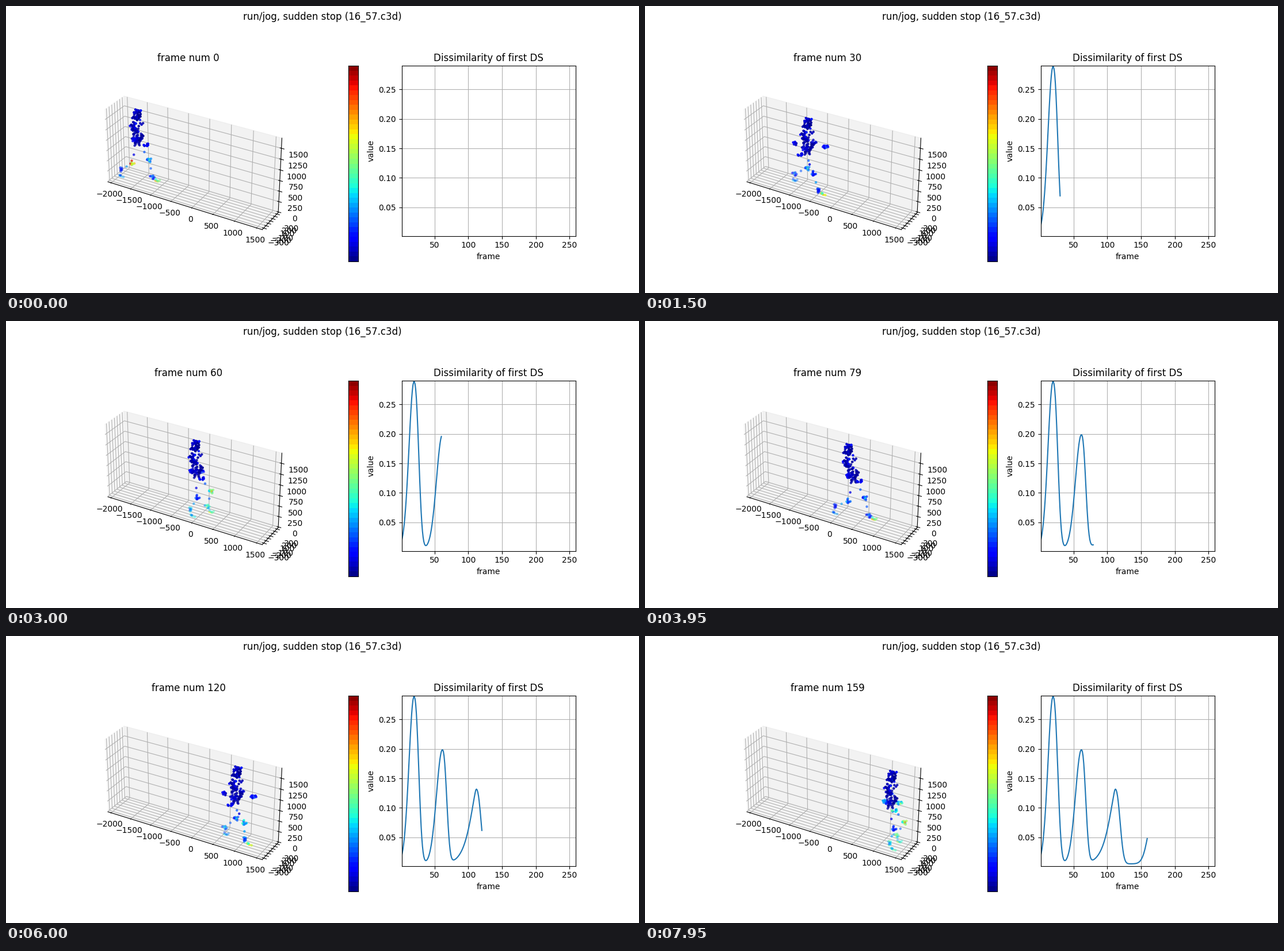
Write a matplotlib script that moves like this. It is 1100 px wide and 500 px high and loops after 8 s.

```python
import matplotlib.pyplot as plt
import numpy as np
from matplotlib.animation import FuncAnimation

FRAMES, INTERVAL = 160, 50
LEVELS = 40
W, H = 1100, 500
HIP_Z, HEAD_Z = 870, 1580

jet = plt.get_cmap("jet")
rng = np.random.default_rng(16)


def bump(x, centre, width, power=2):
    return np.exp(-np.abs((x - centre) / width) ** power)


def cloud(count, *radii):
    """Marker offsets inside an ellipsoid, each with its heat factor and floor."""
    v = rng.normal(size=(count, 3))
    v /= np.linalg.norm(v, axis=1, keepdims=True)
    v *= rng.uniform(0.25, 1, (count, 1)) ** 0.5
    return v * radii, rng.uniform(0.55, 1.35, count), rng.exponential(0.03, count)


PARTS = {
    "head": cloud(46, 100, 100, 145),
    "crown": cloud(1, 5, 5, 5),
    "chest": cloud(34, 125, 185, 130),
    "waist": cloud(42, 135, 150, 105),
    "hips": cloud(12, 75, 95, 80),
}
for side in "AB":
    PARTS.update({
        "elbow" + side: cloud(7, 55, 45, 45),
        "hand" + side: cloud(9, 75, 50, 50),
        "thigh" + side: cloud(1, 10, 10, 10),
        "knee" + side: cloud(10, 55, 50, 60),
        "shin" + side: cloud(1, 10, 10, 10),
        "ankle" + side: cloud(9, 65, 45, 60),
        "toe" + side: cloud(6, 70, 50, 30),
    })


def limb(length, degrees):
    """Vector hanging down, turned forward by an angle."""
    a = np.radians(degrees)
    return np.array([length * np.sin(a), 0, -length * np.cos(a)])


def leg(hip, cycle):
    """Joints of one leg; the foot touches down in front at cycle 0."""
    c, s = np.cos(cycle), np.sin(cycle)
    bend = -21 + 33 * c + 11 * s
    knee = hip + limb(420, 21.5 + 20.5 * c - 7.5 * s - 11 * np.cos(2 * cycle))
    ankle = knee + limb(405, bend)
    toe = ankle + limb(150, bend + 65)
    lift_off = bump(cycle / np.pi % 2, 0.93, 0.06)
    return {
        "thigh": ((hip + knee) / 2, 0.15),
        "knee": (knee, 0.14 + 0.3 * max(0, -s) + 0.6 * lift_off),
        "shin": ((knee + ankle) / 2, 0.2),
        "ankle": (ankle, 0.13 + 0.25 * s * s),
        "toe": (toe, 0.43 + 0.17 * c),
    }


def arm(shoulder, cycle, heat):
    upper = -12 + 27 * np.cos(cycle)
    elbow = shoulder + limb(300, upper)
    return {
        "elbow": (elbow, 0.6 * heat),
        "hand": (elbow + limb(260, upper + 65), heat),
    }


def pose(t):
    """Centre and heat of every body part."""
    # The runner slows down; while braking the pelvis leads and the head lags.
    brake = bump(t, 79, 18)
    x = -1542 + 27.5 * t - 0.066 * t * t + 110 * brake
    steps = 0.93 + 0.019 * t + 0.6 * (1 - np.exp(-t / 12))
    hand_heat = 0.1 + 0.3 * bump(t, 165, 15)

    def spine(z, dx=0, y=0):
        lag = 150 * brake * (z - HIP_Z) / (HEAD_Z - HIP_Z)
        return np.array([x - lag + dx, y, z])

    parts = {
        "head": (spine(HEAD_Z), 0.01),
        "crown": (spine(1715, 115), 0.12),
        "chest": (spine(1340), 0.02),
        "waist": (spine(1070), 0.01),
        "hips": (spine(900), 0.03),
    }
    for side, sign in (("A", -1), ("B", 1)):
        cycle = np.pi * (steps + (sign + 1) / 2)
        joints = leg(spine(HIP_Z, y=90 * sign), cycle)
        joints |= arm(spine(1390, y=180 * sign), cycle + np.pi, hand_heat)
        parts |= {name + side: joint for name, joint in joints.items()}
    return parts


def markers(t):
    points, heat = [], []
    for name, (centre, warmth) in pose(t).items():
        offsets, factor, floor = PARTS[name]
        points.append(centre + offsets)
        heat.append(warmth * factor + floor)
    return np.vstack(points), np.clip(np.concatenate(heat), 0, 1)


# Peaks: centre, height, rise width, rise power, fall width
PEAKS = [
    (19.5, 0.284, 10.5, 2, 8.9),
    (61.5, 0.193, 12.3, 2, 8.2),
    (111.5, 0.127, 14, 1.3, 9.3),
    (170, 0.093, 12.5, 2, 9),
]


def dissimilarity(x):
    total = np.full(len(x), 0.005)
    for centre, height, rise, power, fall in PEAKS:
        total += height * np.where(x < centre, bump(x, centre, rise, power),
                                   bump(x, centre, fall, 2.4))
    return total


def box(left, top, right, bottom):
    """Axes rectangle from pixel edges measured from the top left."""
    return left / W, 1 - bottom / H, (right - left) / W, (bottom - top) / H


fig = plt.figure(figsize=(W / 100, H / 100), dpi=100)
fig.suptitle("run/jog, sudden stop (16_57.c3d)")

ax = fig.add_axes(box(146.5, 104, 487.5, 445), projection="3d")
ax.set_box_aspect((0.8475, 0.167, 0.399))
ax.set(xlim=(-2083, 1626), ylim=(-366, 366), zlim=(-15, 1731))
ax.set_xticks(range(-2000, 1501, 500))
ax.set_yticks(range(-300, 301, 100))
ax.set_zticks(range(0, 1501, 250))
title = ax.set_title("frame num 0", y=1.0)
title.set_y(1.0)  # 3D axes lower their title

bar = fig.add_axes(box(595.1, 104, 612.15, 445))
bar.imshow(jet((np.arange(LEVELS) + 0.5) / LEVELS)[:, None], origin="lower",
           aspect="auto", interpolation="nearest")
bar.set(xticks=[], yticks=[])

plot = fig.add_axes(box(687.55, 103.95, 990, 400.75))
plot.set(xlim=(1.2, 259), ylim=(0.0013, 0.2904), xlabel="frame", ylabel="value")
plot.set_xticks(range(50, 251, 50))
plot.set_yticks(np.arange(1, 6) * 0.05)
plot.set_title("Dissimilarity of first DS", y=1.0)
plot.grid(True)
line, = plot.plot([], [])

drawn = []


def update(t):
    while drawn:
        drawn.pop().remove()
    points, heat = markers(t)
    drawn.append(ax.scatter(*points.T, c=jet(heat), s=5))
    title.set_text(f"frame num {t}")
    x = np.arange(1, t + 1)
    line.set_data(x, dissimilarity(x))
    return drawn + [title, line]


anim = FuncAnimation(fig, update, frames=FRAMES, interval=INTERVAL,
                     init_func=lambda: update(0), repeat=True, repeat_delay=0)
plt.show()
```
